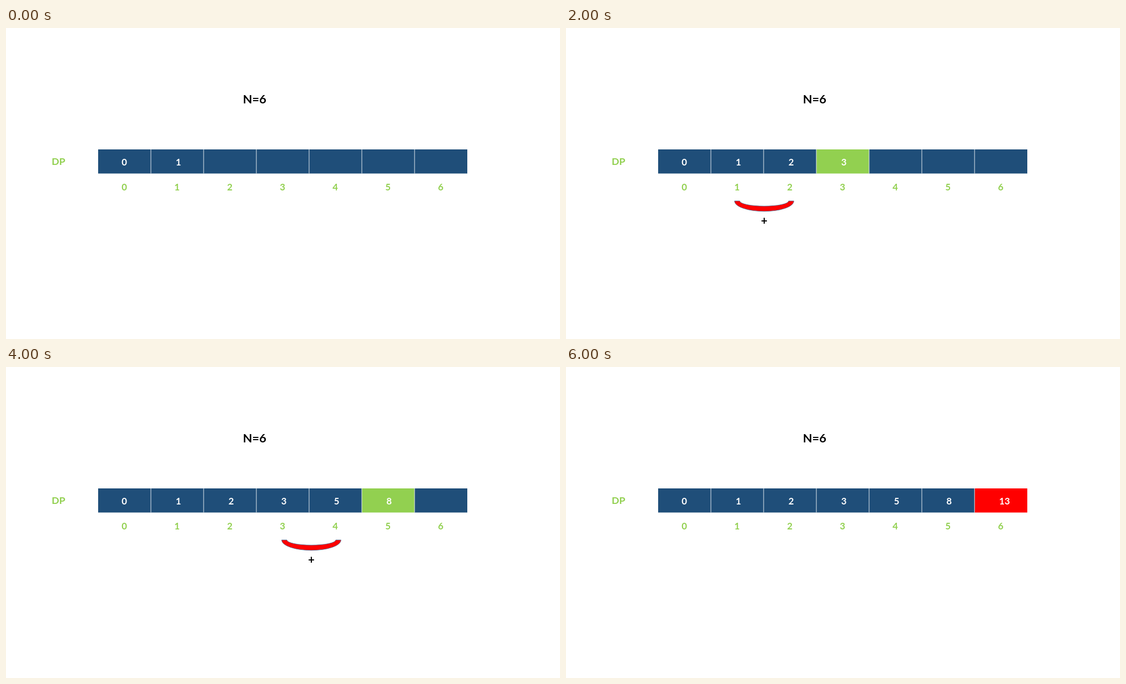
Write an HTML page that moves like this. It is 998 by 561 pixels and loops after 7000 ms.

```html
<!DOCTYPE html>
<html lang="en">
<head>
<meta charset="utf-8">
<title>DP table</title>
<style>
  html, body { margin: 0; width: 100%; height: 100%; overflow: hidden; background: #fff; }
  svg { display: block; width: 998px; height: 561px; }
  text { font: 700 16.8px Lato, Carlito, "Open Sans", sans-serif; text-anchor: middle; }
</style>
</head>
<body>
<svg id="stage" viewBox="0 0 998 561"></svg>
<script>
const BLUE = "#1f4e79", GREEN = "#92d050", RED = "#ff0000";
const STEP = 1000, COUNT = 7, LEFT = 166, PITCH = 95;
const values = [0, 1, 2, 3, 5, 8, 13];
const valueX = [213, 310.5, 405.5, 500.5, 595.5, 690, 790];
// Centre and top of the bracket in steps 1 to 5
const brackets = [[259, 310], [357, 312], [451, 312], [550, 312], [643, 312]];
const stage = document.getElementById("stage");

function add(tag, attrs, parent = stage) {
  const el = document.createElementNS("http://www.w3.org/2000/svg", tag);
  for (const key in attrs) el.setAttribute(key, attrs[key]);
  return parent.appendChild(el);
}

function label(str, x, y, fill, size, parent) {
  const el = add("text", { x, y, fill }, parent);
  if (size) el.style.fontSize = size + "px";
  el.textContent = str;
  return el;
}

label("N=6", 447.8, 135.5, "#000", 21.8);
label("DP", 94.5, 246.8, GREEN, 17.8);

const cells = values.map((value, i) => {
  const x = LEFT + i * PITCH;
  const box = add("rect", { x, y: 219, width: PITCH, height: 43.5 });
  if (i) add("rect", { x: x - 0.5, y: 219, width: 1, height: 43.5, fill: "#e4eaf0" });
  label(i, 213.2 + i * PITCH, 293, GREEN);
  return { box, text: label(value, valueX[i], 247.6, "#fff") };
});

const bracket = add("g", {});
add("path", {
  d: "M-53.5 0A53.5 18.7 0 0 0 53.5 0H44A44 9.3 0 0 1 -44 0Z",
  fill: RED, stroke: "#41719c", "stroke-width": 0.8
}, bracket);
label("+", 0, 42.7, "#000", 20, bracket);

function show(step) {
  cells.forEach(({ box, text }, i) => {
    const active = step > 0 && i === Math.min(step + 1, COUNT - 1);
    const last = step === COUNT - 1;
    box.setAttribute("fill", !active ? BLUE : last ? RED : GREEN);
    text.setAttribute("visibility", i <= step + 1 ? "visible" : "hidden");
  });
  const place = brackets[step - 1];
  bracket.setAttribute("visibility", place ? "visible" : "hidden");
  if (place) bracket.setAttribute("transform", `translate(${place})`);
}

let shown = -1;
const start = performance.now();
function tick() {
  const step = Math.floor((performance.now() - start) / STEP) % COUNT;
  if (step !== shown) show(shown = step);
  requestAnimationFrame(tick);
}
tick();
</script>
</body>
</html>
```
